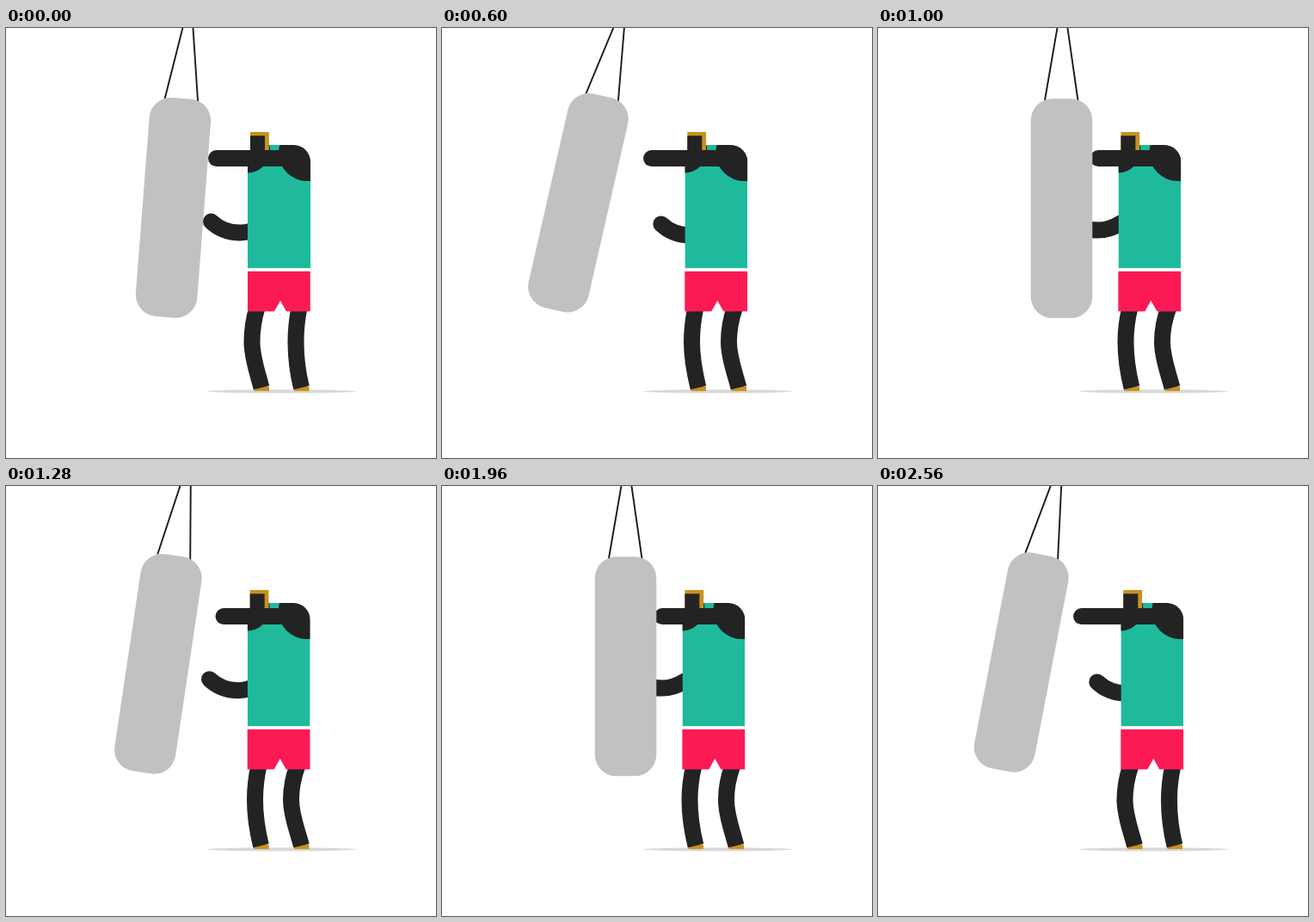
An HTML page for the animation above (2.64 s loop, 500 by 500 pixels).

```html
<!DOCTYPE html>
<html lang="en">
<head>
<meta charset="utf-8">
<title>Boxer</title>
<style>
  html, body { margin: 0; width: 100%; height: 100%; overflow: hidden; background: #fff; }
  svg { display: block; width: 100vw; height: 100vh; }
  .limb { fill: none; stroke: #232323; stroke-width: 19; }
  .round { stroke-linecap: round; }
  .dark { fill: #232323; }
  .gold { fill: #c8911f; }
</style>
</head>
<body>
<svg viewBox="0 0 500 500">
  <defs>
    <clipPath id="shirt"><path d="M281 279.5V156a20 20 0 0 1 20-20H334a20 20 0 0 1 20 20V279.5Z"/></clipPath>
  </defs>
  <ellipse cx="320.5" cy="422.5" rx="86.5" ry="2.1" fill="#d8d8d8"/>
  <path id="low" class="limb round" d="M238.5 225Q252 238 272 238Q285 238 298 230"/>
  <path id="shoeL" class="gold" d="M-8.5 417H9V422.2H-8.5Z"/>
  <path id="shoeR" class="gold" d="M-8.5 417H9V422.2H-8.5Z"/>
  <path id="legL" class="limb"/>
  <path id="legR" class="limb"/>
  <g id="body">
    <g clip-path="url(#shirt)">
      <rect x="281" y="136" width="73" height="143.5" fill="#1fba9c"/>
      <circle class="dark" cx="280.5" cy="142" r="26.5"/>
      <circle class="dark" cx="350" cy="145" r="33"/>
    </g>
    <path d="M281 283H353.8V329.5H326L319 317L312 329.5H281Z" fill="#fc1a55"/>
    <rect class="gold" x="284" y="121" width="21.8" height="21"/>
    <rect class="dark" x="284" y="125.3" width="17" height="18"/>
  </g>
  <path id="high" class="limb round"/>
  <g id="bag">
    <path d="M194 84L215-38L232.6 85" fill="none" stroke="#1a1a1a" stroke-width="1.9"/>
    <rect x="177.7" y="82.3" width="71.6" height="255" rx="25" fill="#c1c1c1"/>
  </g>
</svg>
<script>
  const STEP = 40, LOOP = 2640, LAST = 64;
  // one punch cycle, six poses
  const swing = [4.4, 0, 8.5, 12.85, 10.9, 7.9];
  const sway = [0, -1.6, -0.3, 1.3, 1.3, 0.9];
  const fist = [244.5, 256, 253, 243.5, 236.5, 237];
  const jab = [0, -16, -2, 16.3, 16.3, 11];
  // hip, knee and ankle x for each leg
  const left = {
    hip: [291, 292, 293, 294, 293, 292],
    knee: [286, 288, 289.5, 290.5, 287, 286],
    ankle: [297, 295, 296.5, 298, 298.5, 298]
  };
  const right = {
    hip: [340, 337, 338, 339.5, 342, 341.5],
    knee: [337, 330.5, 331.5, 333.5, 338.5, 338.5],
    ankle: [343.5, 342, 343.5, 345, 345, 344.5]
  };

  const set = (id, name, value) => document.getElementById(id).setAttribute(name, value);
  const shift = (id, x, y = 0) => set(id, 'transform', `translate(${x} ${y})`);

  function drawLeg(side, leg, k) {
    const hip = leg.hip[k], knee = leg.knee[k], ankle = leg.ankle[k];
    set('leg' + side, 'd', `M${hip + 1} 325Q${knee} 345 ${knee} 365` +
      `C${knee} 384 ${ankle - 4} 402 ${ankle} 418.3`);
    shift('shoe' + side, ankle);
  }

  function draw(time) {
    const k = Math.min(Math.floor(time % LOOP / STEP), LAST) % 6;
    set('bag', 'transform', `rotate(${swing[k]} 215 -38)`);
    shift('body', sway[k]);
    shift('low', jab[k], jab[k] * 0.18);
    set('high', 'd', `M${fist[k]} 151.6H${326 + sway[k]}`);
    drawLeg('L', left, k);
    drawLeg('R', right, k);
  }

  const start = performance.now();
  function tick() {
    draw(performance.now() - start);
    requestAnimationFrame(tick);
  }
  tick();
</script>
</body>
</html>
```
